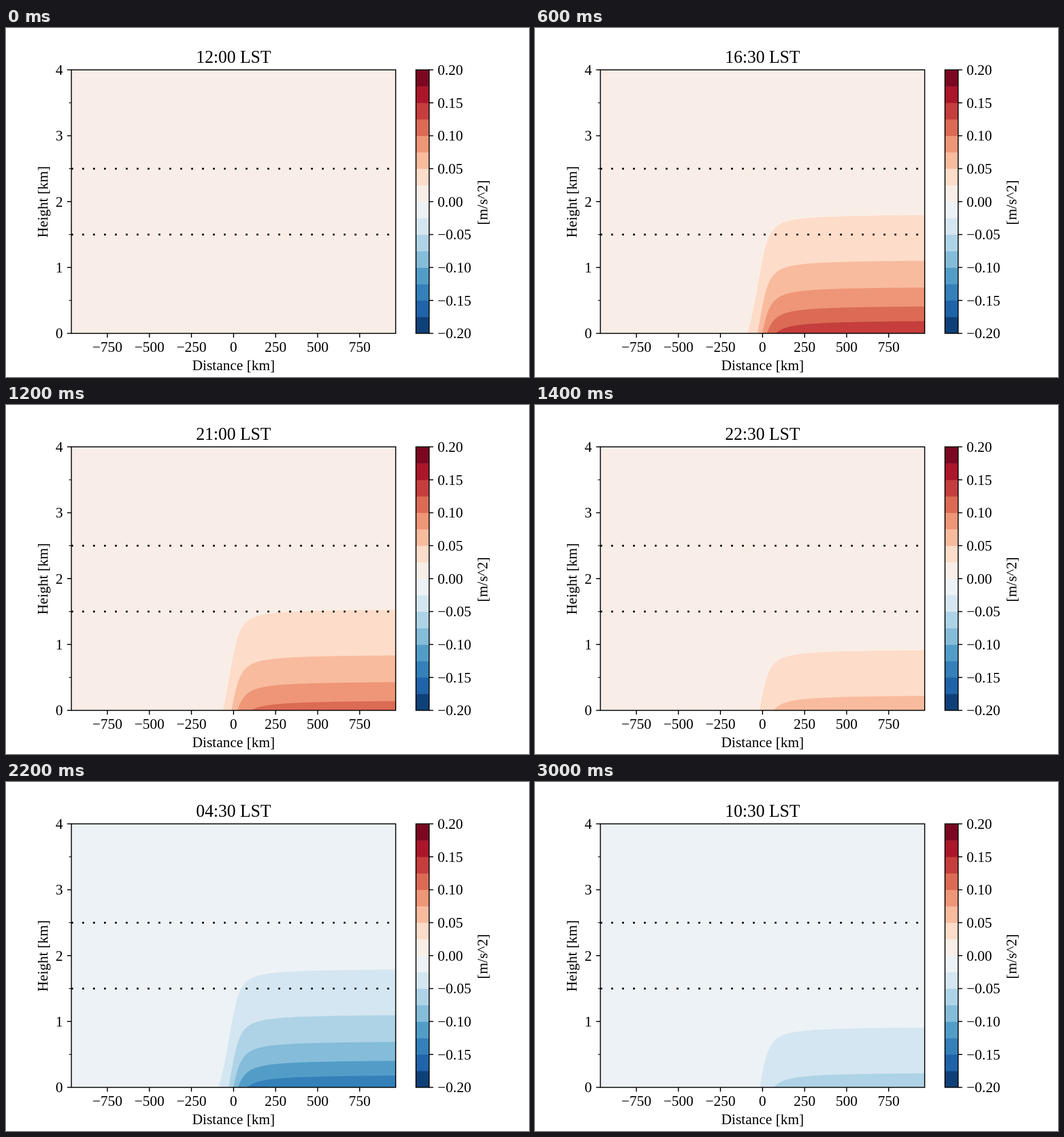
Recreate the animation shown at these times as an HTML page. Size 917 by 611 pixels, loop 3200 ms.

```html
<!DOCTYPE html>
<html lang="en">
<head>
<meta charset="utf-8">
<title>Heating cross-section</title>
<style>
html, body { margin: 0; width: 100%; height: 100%; overflow: hidden; background: #fff; }
svg { display: block; width: 917px; height: 611px; }
text { font: 25.47px "Liberation Serif", "Times New Roman", serif; text-anchor: middle; }
</style>
</head>
<body>
<svg id="chart" viewBox="0 0 917 611"></svg>
<script>
const svg = document.getElementById('chart');
const L = 114.6, R = 683.3, T = 73.3, B = 534.6;      // plot box
const barL = 718.8, barR = 741.9;                     // colour bar
const midX = (L + R) / 2, midY = (T + B) / 2;
const px = km => midX + km * 0.295;
const py = km => B - km * (B - T) / 4;

function add(tag, attrs, text) {
  const el = document.createElementNS('http://www.w3.org/2000/svg', tag);
  for (const k in attrs) el.setAttribute(k, attrs[k]);
  if (text) el.textContent = text;
  return svg.appendChild(el);
}
const box = (x, y, w, h, fill) => add('rect', { x, y, width: w, height: h, fill });
const frame = (x, y, w, h) => add('rect', { x, y, width: w, height: h, fill: 'none', stroke: '#000', 'stroke-width': 1.7 });
const line = (x1, y1, x2, y2, width = 1.7) => add('line', { x1, y1, x2, y2, stroke: '#000', 'stroke-width': width });
const label = (x, y, text, style = '') => add('text', { x, y, style }, text);
const upright = (x, y, text) => add('text', { transform: `translate(${x} ${y}) rotate(-90)` }, text);
const signed = (v, digits) => v.toFixed(digits).replace('-', '\u2212');

// Blue to red in 16 bands of 0.025
const stops = ['053061', '2166ac', '4393c3', '92c5de', 'd1e5f0', 'f7f7f7',
               'fddbc7', 'f4a582', 'd6604d', 'b2182b', '67001f']
  .map(h => [0, 2, 4].map(i => parseInt(h.substr(i, 2), 16)));
function bandColor(i) {
  const p = (i * 16 + 8) / 255 * 10, n = Math.floor(p);
  return `rgb(${stops[n].map((c, k) => Math.round(c + (stops[n + 1][k] - c) * (p - n)))})`;
}

// Heating field: sine in time, exponential in height, arctangent across the coast
const step = 0.025, peak = 0.1655, coast = 50;
const spread = km => 0.5 + Math.atan(km / coast) / Math.PI;
function region(amp, level) {
  let d = '';
  for (let x = 320; x <= R + 1; x += 0.5) {
    const km = (Math.min(x, R) - midX) / 0.295;
    const z = Math.log(amp * spread(km) / level);
    if (z <= 0) continue;
    d += (d ? 'L' : `M${x} ${B}L`) + `${Math.min(x, R)} ${py(z).toFixed(2)}`;
  }
  return d && d + `L${R} ${B}Z`;
}

const ground = box(L, T, R - L, B - T);
const layers = [1, 2, 3, 4, 5, 6].map(() => add('path', {}));

for (const km of [1.5, 2.5])
  add('path', { d: `M${L} ${py(km)}H${R}`, stroke: '#000', 'stroke-width': 3.18, 'stroke-dasharray': '3.18 15.92' });

frame(L, T, R - L, B - T);
for (let km = 0; km <= 4; km++) {
  const y = py(km);
  line(L - 7.4, y, L, y);
  label(99.8, y + 8.6, String(km), 'text-anchor:end');
  if (km < 4) line(L - 4.2, py(km + 0.5), L, py(km + 0.5), 1.27);
}
for (let km = -750; km <= 750; km += 250) {
  line(px(km), B, px(km), B + 7.4);
  label(px(km), 566.8, signed(km, 0));
}
label(midX, 599, 'Distance [km]');
upright(73, midY + 0.5, 'Height [km]');

const bandH = (B - T) / 16;
for (let i = 0; i < 16; i++) {
  const y = B - (i + 1) * bandH;
  box(barL, y, barR - barL, B - y, 'none').setAttribute('fill', bandColor(i));
  svg.lastChild.setAttribute('height', bandH + (i ? 0.4 : 0));
}
frame(barL, T, barR - barL, B - T);
for (let i = 0; i <= 8; i++) {
  const y = B - i * 2 * bandH;
  line(barR, y, barR + 7.4, y);
  label(756.7, y + 8.6, signed((i - 4) * 0.05, 2), 'text-anchor:start');
}
upright(844, midY + 1.5, '[m/s^2]');

const title = label(midX, 61, '', 'font-size:30.56px');

let shown = -1;
function draw() {
  const n = Math.floor(performance.now() / 200) % 16;
  if (n !== shown) {
    shown = n;
    const hours = (12 + n * 1.5) % 24;
    title.textContent = String(Math.floor(hours)).padStart(2, '0') + (hours % 1 ? ':30' : ':00') + ' LST';
    const night = n > 8;
    const amp = peak * Math.abs(Math.sin(n * Math.PI / 8)) * (night ? 0.994 : 1);
    const color = i => bandColor(night ? 7 - i : 8 + i);
    ground.setAttribute('fill', color(0));
    layers.forEach((el, i) => {
      el.setAttribute('d', region(amp, (i + 1) * step));
      el.setAttribute('fill', color(i + 1));
    });
  }
  requestAnimationFrame(draw);
}
draw();
</script>
</body>
</html>
```
